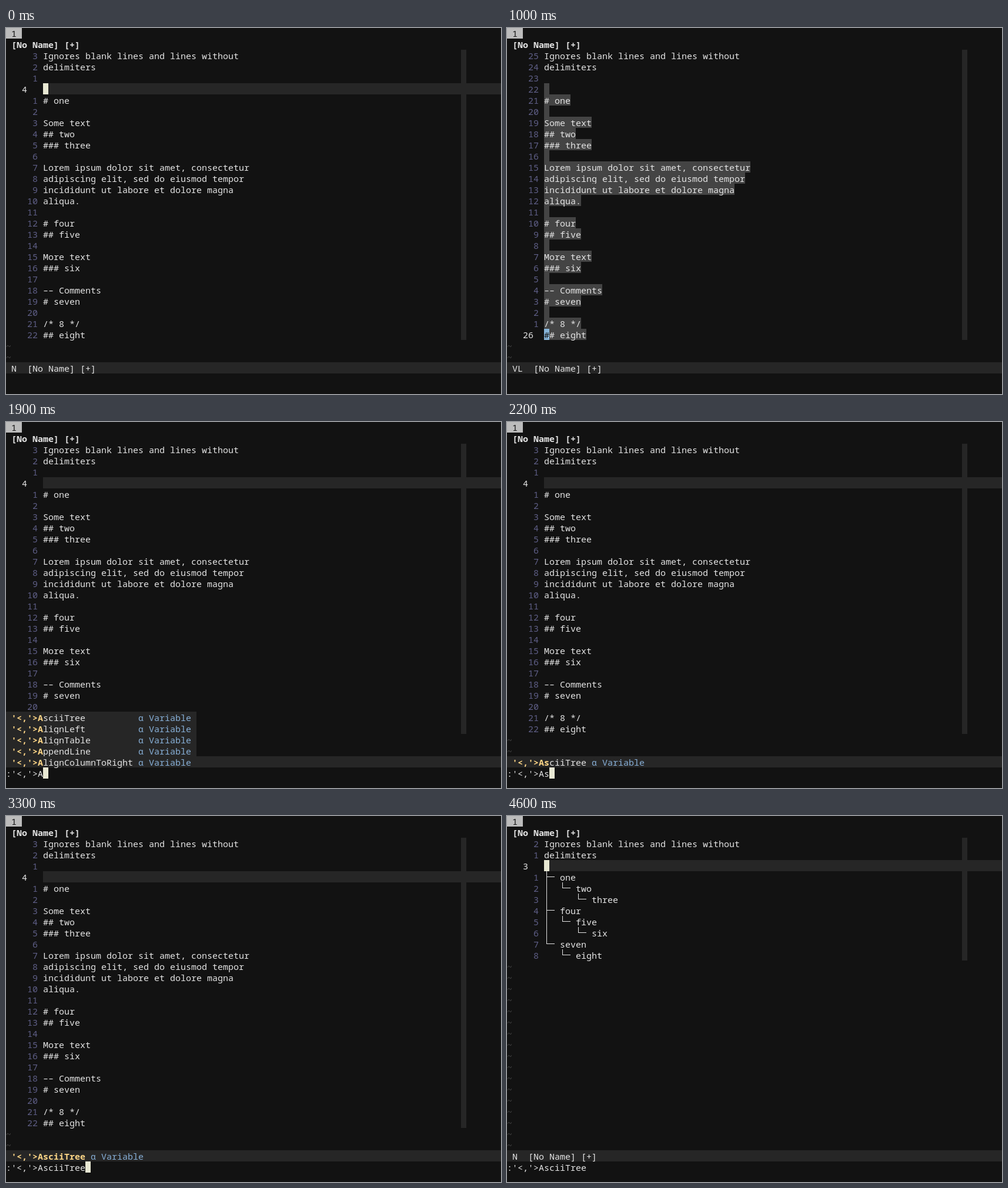
An HTML page with a canvas for the animation above (8000 ms loop, 842 px wide and 623 px high).

```html
<!DOCTYPE html>
<html lang="en">
<head>
<meta charset="utf-8">
<title>Text outline to tree</title>
<style>
html, body { margin: 0; width: 100%; height: 100%; overflow: hidden; background: #121212; }
canvas { display: block; }
</style>
</head>
<body>
<canvas id="stage" width="842" height="623"></canvas>
<script>
const ctx = document.getElementById('stage').getContext('2d');
const W = 842, H = 623, CW = 9, CH = 19, LOOP = 8000;
const FIRST_ROW = 2, TEXT_COL = 7, STATUS_ROW = 30, CMD_ROW = 31;
const C = {
  bg: '#121212', bar: '#262626', text: '#e4e4e4', number: '#5f5f87', tilde: '#444444',
  select: '#444444', cursor: '#e8e8d3', visual: '#87b5d9', match: '#ffd787',
  kind: '#87afd7', tab: '#bcbcbc'
};

const intro = ['Ignores blank lines and lines without', 'delimiters', ''];
const outline = [...intro, '', '# one', '', 'Some text', '## two', '### three', '',
  'Lorem ipsum dolor sit amet, consectetur', 'adipiscing elit, sed do eiusmod tempor',
  'incididunt ut labore et dolore magna', 'aliqua.', '', '# four', '## five', '',
  'More text', '### six', '', '–– Comments', '# seven', '', '/* 8 */', '## eight'];
const tree = [...intro, '├─ one', '│  └─ two', '│     └─ three', '├─ four',
  '│  └─ five', '│     └─ six', '└─ seven', '   └─ eight'];

const RANGE = "'<,'>", COMMAND = 'AsciiTree';
const typedAt = [1900, 2200, 2300, 2500, 2600, 2800, 3000, 3100, 3200];
// The menu highlight trails the typing once the list has narrowed.
const matchedAt = typedAt.map((t, i) => i < 2 ? t : t + 100);
const allCommands = [COMMAND, 'AlignLeft', 'AlignTable', 'AppendLine', 'AlignColumnToRight'];

const rowTop = row => row * CH - 1;
const countUntil = (times, t) => times.filter(at => at <= t).length;

function rect(x, y, w, h, color) {
  ctx.fillStyle = color;
  ctx.fillRect(x, y, w, h);
}

function cells(col, row, count, color) {
  rect(col * CW, rowTop(row), count * CW, CH, color);
}

function write(str, col, row, color = C.text, bold = false) {
  ctx.font = `${bold ? 'bold ' : ''}15px "Noto Sans Mono", "DejaVu Sans Mono", monospace`;
  ctx.fillStyle = color;
  ctx.fillText(str.replace(/[├└│─]/g, ' '), col * CW, rowTop(row) + 16);
  [...str].forEach((ch, i) => boxGlyph(ch, (col + i) * CW, rowTop(row), color));
}

function boxGlyph(ch, x, y, color) {
  if ('├│'.includes(ch)) rect(x + 4, y, 1, CH, color);
  if (ch === '└') rect(x + 4, y, 1, 10, color);
  if ('├└'.includes(ch)) rect(x + 4, y + 9, 5, 1, color);
  if (ch === '─') rect(x, y + 9, CW, 1, color);
}

function drawCursor(col, row, color, under = '') {
  cells(col, row, 1, color);
  write(under, col, row, C.bg);
}

function drawBuffer({ lines, current, selectFrom, cursorLine, cursor }) {
  rect(774, rowTop(FIRST_ROW), CW, lines.length * CH, C.bar);
  lines.forEach((line, i) => {
    const row = FIRST_ROW + i, here = i === current;
    if (here && cursorLine) rect(TEXT_COL * CW, rowTop(row), W, CH, C.bar);
    if (i >= selectFrom) cells(TEXT_COL, row, Math.max(1, line.length), C.select);
    if (here) write(String(i + 1), 3, row);
    else write(String(Math.abs(i - current)).padStart(2), 4, row, C.number);
    write(line, TEXT_COL, row);
    if (here && cursor) drawCursor(TEXT_COL, row, cursor, line.charAt(0));
  });
  for (let row = FIRST_ROW + lines.length; row < STATUS_ROW; row++) write('~', 0, row, C.tilde);
}

function drawMenu(matched) {
  const names = matched < 2 ? allCommands : [COMMAND];
  const width = Math.max(...names.map(n => n.length));
  names.forEach((name, i) => {
    const row = STATUS_ROW - names.length + 1 + i;
    cells(0, row, width + 18, C.bar);
    write(RANGE + name.slice(0, matched), 1, row, C.match, true);
    write(name.slice(matched), 6 + matched, row);
    write('α Variable', 7 + width, row, C.kind);
  });
}

function stateAt(t) {
  const last = outline.length - 1;
  if (t < 500) return { lines: outline, current: 3, cursorLine: true, cursor: C.cursor, mode: 'N' };
  if (t < 1000) return { lines: outline, current: 3, cursor: C.visual, mode: 'VL' };
  if (t < 1700) return { lines: outline, current: last, selectFrom: 3, cursor: C.visual, mode: 'VL' };
  if (t < 1900) return { lines: outline, current: last, selectFrom: 3, mode: ':', typing: true };
  if (t < 3700) return { lines: outline, current: 3, cursorLine: true, mode: ':', typing: true, menu: true };
  return { lines: tree, current: t < 4600 ? 3 : 2, cursorLine: true, cursor: C.cursor, mode: 'N', done: true };
}

function draw(t) {
  const s = stateAt(t);
  rect(0, 0, W, H, C.bg);
  rect(0, 0, 27, 18, C.tab);
  write('1', 1, 0, C.bg);
  write('[No Name] [+]', 1, 1, C.text, true);
  drawBuffer(s);

  rect(0, rowTop(STATUS_ROW), W, CH, C.bar);
  if (s.menu) drawMenu(countUntil(matchedAt, t));
  else write(`${s.mode}  [No Name] [+]`, 1, STATUS_ROW);

  if (s.typing || s.done) {
    const command = ':' + RANGE + COMMAND.slice(0, countUntil(typedAt, t));
    write(command, 0, CMD_ROW);
    if (s.typing) drawCursor(command.length, CMD_ROW, C.cursor);
  }
}

const start = performance.now();
function tick() {
  draw((performance.now() - start) % LOOP);
  requestAnimationFrame(tick);
}
tick();
</script>
</body>
</html>
```
